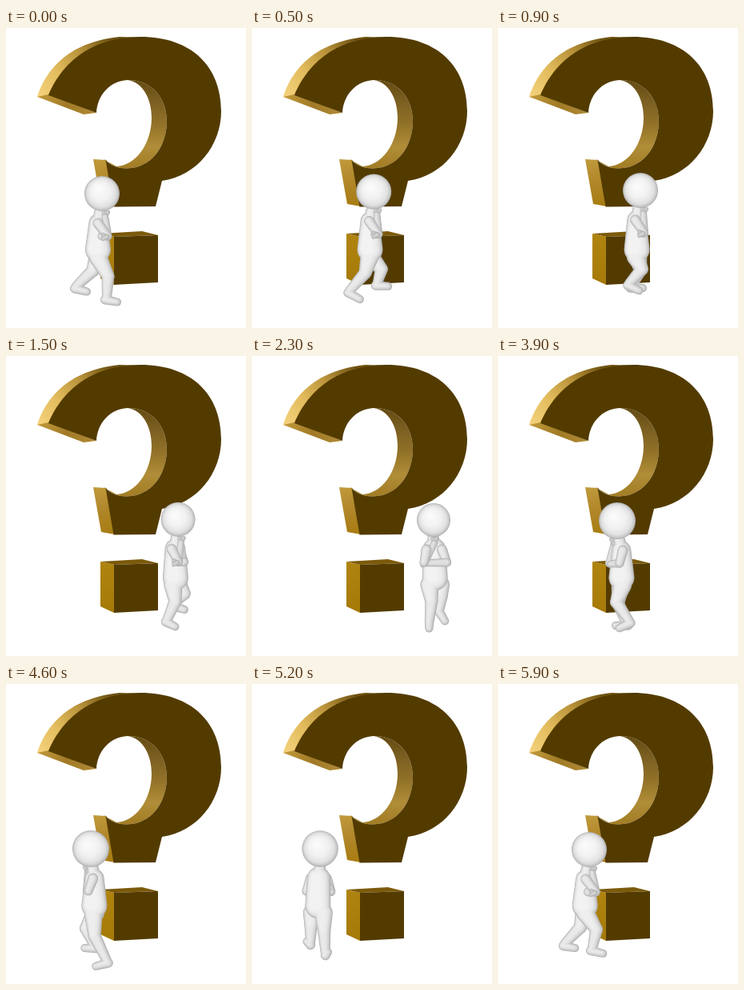
An HTML page with a canvas for the animation above (6000 ms loop, 300 by 375 pixels).

```html
<!DOCTYPE html>
<html>
<head>
<meta charset="utf-8">
<style>
html, body { margin: 0; width: 100%; height: 100%; overflow: hidden; background: #fff; }
canvas { display: block; width: 300px; height: 375px; }
</style>
</head>
<body>
<canvas id="stage" width="300" height="375"></canvas>
<script>
const ctx = document.getElementById('stage').getContext('2d');
const LOOP = 6000, STEP = 100, STRIDE = 1200, TAU = Math.PI * 2;

// time, head x, head y, head radius, yaw in degrees, ground y
const KEYS = [
  [0, 120, 207, 22, 0, 341],
  [900, 178, 203, 22, 10, 336],
  [1400, 210, 204, 21.5, 22, 336],
  [1900, 230, 205, 21.3, 48, 337],
  [2300, 227, 205, 21, 76, 338],
  [3100, 199, 203, 22, 118, 343],
  [3900, 149, 206, 23, 170, 348],
  [4600, 106, 206, 23, 190, 351],
  [4900, 92, 206, 23, 215, 347],
  [5300, 85, 206, 22.6, 285, 343],
  [5600, 97, 207, 22.2, 335, 341],
  [5900, 114, 207, 22, 355, 341]
];
const WRAP = [LOOP, 0, 0, 0, 360, 0];

function keyAt(i) {
  const n = KEYS.length, turn = Math.floor(i / n);
  return KEYS[i - turn * n].map((v, c) => v + WRAP[c] * turn);
}

// Hermite interpolation through the unevenly spaced keys
function stateAt(t) {
  let i = KEYS.length - 1;
  while (KEYS[i][0] > t) i--;
  const [a, b, c, d] = [-1, 0, 1, 2].map(k => keyAt(i + k));
  const span = c[0] - b[0], u = (t - b[0]) / span;
  const u2 = u * u, u3 = u2 * u;
  return b.map((v, k) => {
    const m0 = (c[k] - a[k]) / (c[0] - a[0]) * span;
    const m1 = (d[k] - b[k]) / (d[0] - b[0]) * span;
    return (2 * u3 - 3 * u2 + 1) * v + (u3 - 2 * u2 + u) * m0 +
           (3 * u2 - 2 * u3) * c[k] + (u3 - u2) * m1;
  });
}

function gradient(x0, y0, x1, y1, ...colors) {
  const g = ctx.createLinearGradient(x0, y0, x1, y1);
  colors.forEach((c, i) => g.addColorStop(i / (colors.length - 1), c));
  return g;
}

function shape(d, fill) {
  ctx.fillStyle = fill;
  ctx.fill(new Path2D(d));
}

function drawMark() {
  const face = '#533b00';
  shape('M39 86C49 56 74 18 142 11L168 12L90 50L54 86Z',
        gradient(42, 86, 130, 14, '#f3d27c', '#e2bb5c', '#b8923a', '#6f5312'));
  shape('M39 86L53 83L113 106L97 108Z', gradient(39, 86, 113, 106, '#c39a3c', '#a07a26', '#b18a35'));
  shape('M109 164L125 165L136 223L119 220Z', gradient(114, 164, 127, 222, '#c09a3c', '#b0862a', '#a87d12'));
  shape('M125 165C134 176 150 177 163 174C188 167 201 142 201 116C201 86 180 64 152 65' +
        'C172 68 182 90 182 112C182 145 162 172 138 173L122 164Z',
        gradient(165, 65, 165, 176, '#654b12', '#7c6022', '#927228', '#b08d38', '#a27c24'));
  shape('M53 84C68 49 100 12 168 11C232 11 269 48 269 104C269 146 239 185 195 191' +
        'L187 223L134.5 223.5L124.5 165C134 176 150 177 163 174C188 167 201 142 201 116' +
        'C201 86 180 64 152 65C130 66 114 84 113 106Z', face);
  shape('M118 257L170 254L190 259L135 261Z', '#7c5a0b');
  shape('M118 257L135 261L135 321L118 313Z', gradient(118, 257, 135, 320, '#b0840f', '#a57a08'));
  shape('M135 261L190 259L190 318L135 321Z', face);
}

// A capsule whose two ends have different radii
function capsule([ax, ay], [bx, by], ra, rb) {
  const d = Math.hypot(bx - ax, by - ay);
  ctx.beginPath();
  if (d <= Math.abs(ra - rb) + 0.01) {
    const big = ra > rb;
    ctx.arc(big ? ax : bx, big ? ay : by, Math.max(ra, rb), 0, TAU);
  } else {
    const dir = Math.atan2(by - ay, bx - ax), open = Math.acos((ra - rb) / d);
    ctx.arc(ax, ay, ra, dir + open, dir - open + TAU);
    ctx.arc(bx, by, rb, dir - open, dir + open);
  }
  ctx.fill();
}

const SHADES = [[0, '#b0b0b0'], [0.7, '#c4c4c4'], [1.5, '#d3d3d3'], [2.6, '#e0e0e0'],
                [4, '#e9e9e9'], [6, '#eeeeee'], [8.5, '#f2f2f2']];

// Parts of one group share their shading, so the joints stay smooth
function solid(parts) {
  for (const [inset, color] of SHADES) {
    ctx.fillStyle = color;
    for (const [a, b, ra, rb] of parts) {
      if (Math.min(ra, rb) - inset < 0.5) continue;
      const shift = ([x, y]) => [x - inset * 0.4, y - inset * 0.15];
      capsule(shift(a), shift(b), ra - inset, rb - inset);
    }
  }
}

function drawHead(x, y, r) {
  const g = ctx.createRadialGradient(x - r * 0.2, y - r * 0.25, r * 0.1, x, y, r);
  [[0, '#fafafa'], [0.5, '#f1f1f1'], [0.8, '#e0e0e0'], [0.94, '#c4c4c4'], [1, '#a8a8a8']]
    .forEach(([p, c]) => g.addColorStop(p, c));
  ctx.fillStyle = g;
  ctx.beginPath();
  ctx.arc(x, y, r, 0, TAU);
  ctx.fill();
}

function drawWalker(t) {
  const [, hx, hy, hr, yaw, ground] = stateAt(t);
  const cos = Math.cos(yaw * Math.PI / 180), sin = Math.sin(yaw * Math.PI / 180);
  const DEPTH = 0.5, phase = t / STRIDE;
  const across = (f, r) => f * cos - r * sin;
  const toward = (f, r) => f * sin + r * cos;
  const top = hx - 5 * cos + 2 * sin, hip = hx - 5 * cos + 3 * sin;

  function leg(side, p) {
    const swing = Math.cos(p * TAU), lift = 12 * Math.max(0, -Math.sin(p * TAU));
    const reach = (11 + 8 * Math.abs(cos)) * swing - 8 * Math.abs(cos);
    const heel = Math.max(0, -swing) * 5;
    const spot = (f, r, y) => [hip + across(f, r), y + toward(f, r) * DEPTH];
    const root = [hip + across(0, side * 7), 286];
    const ankle = spot(reach, side * 9, ground - 9 - lift - heel);
    const sole = spot(reach - 2, side * 9, ground - 6 - lift - heel);
    const toe = spot(reach + 13, side * 13, ground - 5 - lift * 0.8);
    const bend = 7 + lift * 0.4;
    const knee = [(root[0] + ankle[0]) / 2 + across(bend, 0), (root[1] + ankle[1]) / 2 - 1];
    return {
      near: toward(reach * 0.3, side * 9),
      parts: [[root, knee, 11.5, 8], [knee, ankle, 8, 6], [sole, toe, 6, 5]]
    };
  }

  // Upper arm, forearm and hand are layered separately by depth
  function arm(side, elbow, hand, fan, upright) {
    const spot = ([f, r, y]) => [top + across(f, r), hy + y];
    const depth = ([f, r]) => toward(f, r);
    const a = spot([0, side * 10, 37]), b = spot(elbow), c = spot(hand);
    const fingers = [-3, 0, 3].map(gap => [c, [
      c[0] + across(fan[0], fan[1]) + gap * upright,
      c[1] + fan[2] + gap * (1 - upright)
    ], 3, 2.2]);
    return [
      { near: depth(elbow), draw: () => solid([[a, b, 6.5, 5.5]]) },
      { near: (depth(elbow) + depth(hand)) / 2, draw: () => solid([[b, c, 5.5, 4.2]]) },
      { near: depth(hand), draw: () => fingers.forEach(f => solid([f])) }
    ];
  }

  const [far, close] = [leg(1, phase), leg(-1, phase + 0.5)].sort((a, b) => a.near - b.near);
  const arms = [
    ...arm(1, [12, 16, 53], [9, 2, 29], [1, 0, -6], 1),
    ...arm(-1, [5, -15, 53], [11, 17, 54], [-5, 0, 0], 0)
  ].sort((a, b) => a.near - b.near);

  solid(far.parts);
  arms.filter(p => p.near < 0).forEach(p => p.draw());
  const chest = [top, hy + 37], belly = [hip, 277];
  solid([[[hx - 2 * cos, hy + 20], chest, 7, 8],
         [chest, belly, 11.5 + 3 * Math.abs(sin), 16], ...close.parts]);
  drawHead(hx, hy, hr);
  arms.filter(p => p.near >= 0).forEach(p => p.draw());
}

function frame(now) {
  const t = Math.floor(now % LOOP / STEP) * STEP;
  ctx.fillStyle = '#fff';
  ctx.fillRect(0, 0, 300, 375);
  drawMark();
  drawWalker(t);
  requestAnimationFrame(() => frame(performance.now() - start));
}

const start = performance.now();
frame(0);
</script>
</body>
</html>
```
